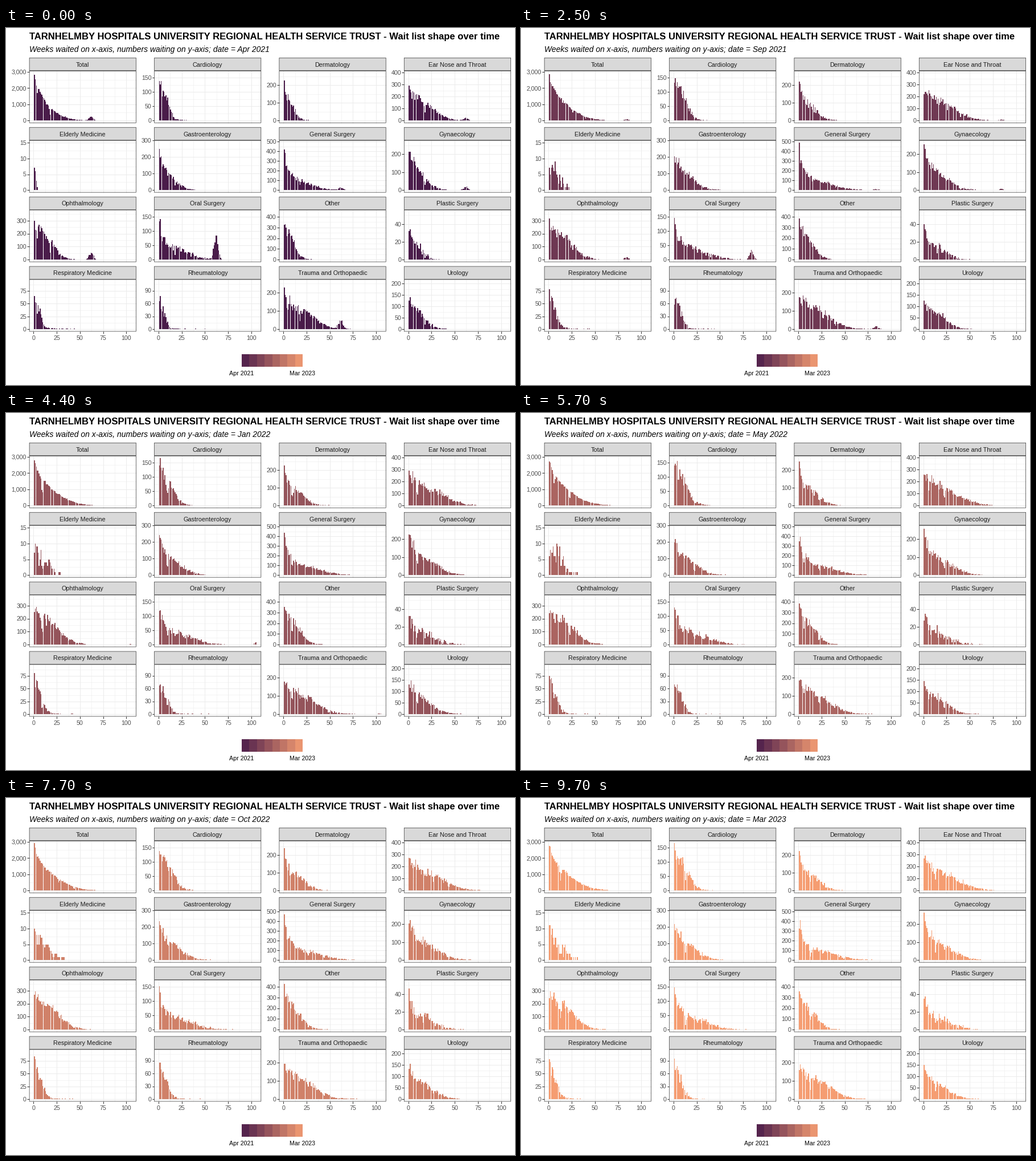
A matplotlib script that plays this animation: 894x626 px, repeating every 10000 ms.

```python
import numpy as np
import matplotlib.pyplot as plt
from matplotlib.animation import FuncAnimation
from matplotlib.collections import PolyCollection
from matplotlib.patches import Rectangle

W, H, DPI = 894, 626, 100
PX = 72 / DPI
COL_PITCH, ROW_PITCH = 219.4, 121.9
WEEK_PX, ZERO_X, ZERO_Y = 1.63, 48.4, 162.4
BAR_H, PANEL_H = 83.2, 87.4
DARK, GRID, GREY = "#333333", "#ebebeb", "#4d4d4d"

plt.rcParams["font.family"] = "Liberation Sans"

WEEKS = np.arange(1, 106)
MONTHS = "Jan Feb Mar Apr May Jun Jul Aug Sep Oct Nov Dec".split()
DATES = [f"{MONTHS[(k + 3) % 12]} {2021 + (k + 3) // 12}" for k in range(24)]
LOW, HIGH = np.array([74, 28, 74]) / 255, np.array([245, 157, 114]) / 255

panels = []


def shade(part):
    return LOW + (HIGH - LOW) * part


def holiday_dips(cohort):
    """Fewer referrals in the yearly Christmas and Easter weeks."""
    factor = np.ones(len(cohort))
    for year in range(3):
        for centre, depth in ((-18 + 52.5 * year, .58), (-4 + 55 * year, .25)):
            factor *= 1 - depth * np.exp(-((cohort - centre) / .9) ** 2)
    return factor


def waiting_counts(seed, peak, tau, share, reach, late_reach, hump):
    """Counts per week waited for each month; cohorts age by 4.35 weeks a month.

    A quick exponential drop sits on a plateau (share of the peak) that
    ends around `reach` weeks and stretches to `late_reach` with time.
    """
    rng = np.random.default_rng(seed)
    cohort_noise = rng.normal(size=230)
    months = []
    for k in range(24):
        now = round(4.35 * k)
        cohort = now - WEEKS
        end = reach + (late_reach - reach) * (1 - np.exp(-now / 20))
        drop = (1 - share) * np.exp((1 - WEEKS) / tau)
        plateau = share / (1 + np.exp(4 * (WEEKS / end - 1)))
        stragglers = .02 * np.exp(-WEEKS / 22)
        mean = peak * (drop + plateau + stragglers) * holiday_dips(cohort)
        mean += hump * np.exp(-now / 20 - ((cohort + 62) / 3.2) ** 2)
        z = .8 * cohort_noise[cohort + 110] + .4 * rng.normal(size=len(WEEKS))
        z = np.clip(z, -2, 2)
        months.append(np.maximum(0, np.round(mean * (1 + .08 * z) + .6 * np.sqrt(mean) * z)))
    return np.array(months)


def panel(name, step, top, *shape, hump=0):
    """step: axis tick spacing; top: tallest count the axis holds."""
    counts = waiting_counts(len(panels) + 7, *shape, hump) if shape else None
    panels.append([name, step, BAR_H / top, counts])


panel("Total", 1000, 2920)
panel("Cardiology", 50, 165.5, 145, 5, .7, 11, 17)
panel("Dermatology", 100, 268, 220, 3, .48, 12, 23)
panel("Ear Nose and Throat", 100, 396, 285, 8, .58, 29, 40, hump=20)
panel("Elderly Medicine", 5, 15, 10, 2, .65, 2, 18)
panel("Gastroenterology", 100, 287, 230, 6, .43, 19, 27)
panel("General Surgery", 100, 489, 410, 5, .26, 31, 41, hump=22)
panel("Gynaecology", 100, 264, 230, 6, .44, 20, 33, hump=15)
panel("Ophthalmology", 100, 365, 270, 6, .78, 21, 29, hump=50)
panel("Oral Surgery", 50, 166, 130, 5, .36, 32, 38, hump=75)
panel("Other", 100, 442, 350, 5, .62, 13, 20)
panel("Plastic Surgery", 20, 53.3, 34, 5, .45, 16, 30)
panel("Respiratory Medicine", 25, 93, 75, 4, .5, 8, 11)
panel("Rheumatology", 30, 111, 75, 4, .8, 7, 11)
panel("Trauma and Orthopaedic", 100, 261, 190, 6, .66, 33, 35, hump=45)
panel("Urology", 50, 209, 130, 8, .55, 19, 28)
panels[0][3] = sum(p[3] for p in panels[1:])

fig = plt.figure(figsize=(W / DPI, H / DPI), dpi=DPI, facecolor="white")
ax = fig.add_axes([0, 0, 1, 1])
ax.set(xlim=(0, W), ylim=(H, 0))
ax.axis("off")


def text(x, y, s, size, color="black", ha="center", **kw):
    return ax.text(x, y, s, fontsize=size * PX, color=color, ha=ha, va="baseline", **kw)


def line(x0, y0, x1, y1, color, width=1):
    ax.plot([x0, x1], [y0, y1], color=color, lw=width * PX, zorder=1,
            solid_capstyle="butt")


def box(x0, y0, x1, y1, face):
    """Rectangle whose thin outline lies inside its edges."""
    edge = .7
    ax.add_patch(Rectangle((x0 + edge / 2, y0 + edge / 2), x1 - x0 - edge, y1 - y0 - edge,
                           facecolor=face, edgecolor=DARK, lw=edge * PX,
                           zorder=4, snap=False))


def origin(i):
    return ZERO_X + i % 4 * COL_PITCH, ZERO_Y + i // 4 * ROW_PITCH


def draw_panel(i, name, step, scale):
    x0, y0 = origin(i)
    left, right = x0 - 7.65, x0 + 180.4
    top, bottom = y0 - PANEL_H, y0 + 4.2
    for k in range(9):
        x = x0 + 12.5 * k * WEEK_PX
        line(x, top, x, bottom, GRID, .5 if k % 2 else 1)
        if k % 2 == 0 and i >= 12:
            line(x, bottom, x, bottom + 3.5, DARK)
            text(x, bottom + 15, f"{12.5 * k:.0f}", 10.6, GREY)
    for k in range(int(PANEL_H / (step / 2 * scale)) + 1):
        y = y0 - k * step / 2 * scale
        line(left, y, right, y, GRID, .5 if k % 2 else 1)
        if k % 2 == 0:
            line(left - 3.5, y, left, y, DARK)
            text(left - 4.8, y + 3.8, f"{k * step // 2:,}", 10.6, GREY, "right")
    box(left, top, right, bottom, "none")
    box(left, top - 23, right, top, "#d9d9d9")
    text((left + right) / 2, y0 - 94.8, name, 10.85, "#1a1a1a", zorder=5)


for i, (name, step, scale, _) in enumerate(panels):
    draw_panel(i, name, step, scale)

text(41, 20, "TARNHELMBY HOSPITALS UNIVERSITY REGIONAL HEALTH SERVICE TRUST"
     " - Wait list shape over time", 16.67, ha="left", weight="bold")
subtitle = text(41, 42, "", 13.9, ha="left", style="italic")

for k in range(8):
    ax.add_patch(Rectangle((414 + k * 107 / 8, 572), 107 / 8, 22, lw=0,
                           facecolor=shade((k + .5) / 8)))
text(413.5, 609, DATES[0], 10.6)
text(521, 609, DATES[-1], 10.6)


def bar_shapes(month):
    shapes = []
    for i, (_, _, scale, counts) in enumerate(panels):
        x0, y0 = origin(i)
        left = x0 + (WEEKS - .45) * WEEK_PX
        right = left + .9 * WEEK_PX
        top = y0 - np.minimum(counts[month] * scale, BAR_H)
        base = np.full(len(WEEKS), y0)
        quads = np.array([[left, base], [left, top], [right, top], [right, base]])
        shapes.append(quads.transpose(2, 0, 1)[counts[month] > 0])
    return np.concatenate(shapes)


SHAPES = [bar_shapes(k) for k in range(24)]
bars = ax.add_collection(PolyCollection([], lw=0, zorder=3), autolim=False)
CHANGES = np.array([*range(5, 20, 5), *range(20, 97, 4)])


def update(frame):
    month = np.sum(frame >= CHANGES)
    bars.set_verts(SHAPES[month])
    bars.set_facecolor(shade(month / 23))
    # The caption follows the bars one frame later.
    date = DATES[np.sum(frame > CHANGES)]
    subtitle.set_text(f"Weeks waited on x-axis, numbers waiting on y-axis; date = {date}")
    return bars, subtitle


anim = FuncAnimation(fig, update, frames=100, interval=100, repeat=True, repeat_delay=0)
plt.show()
```
